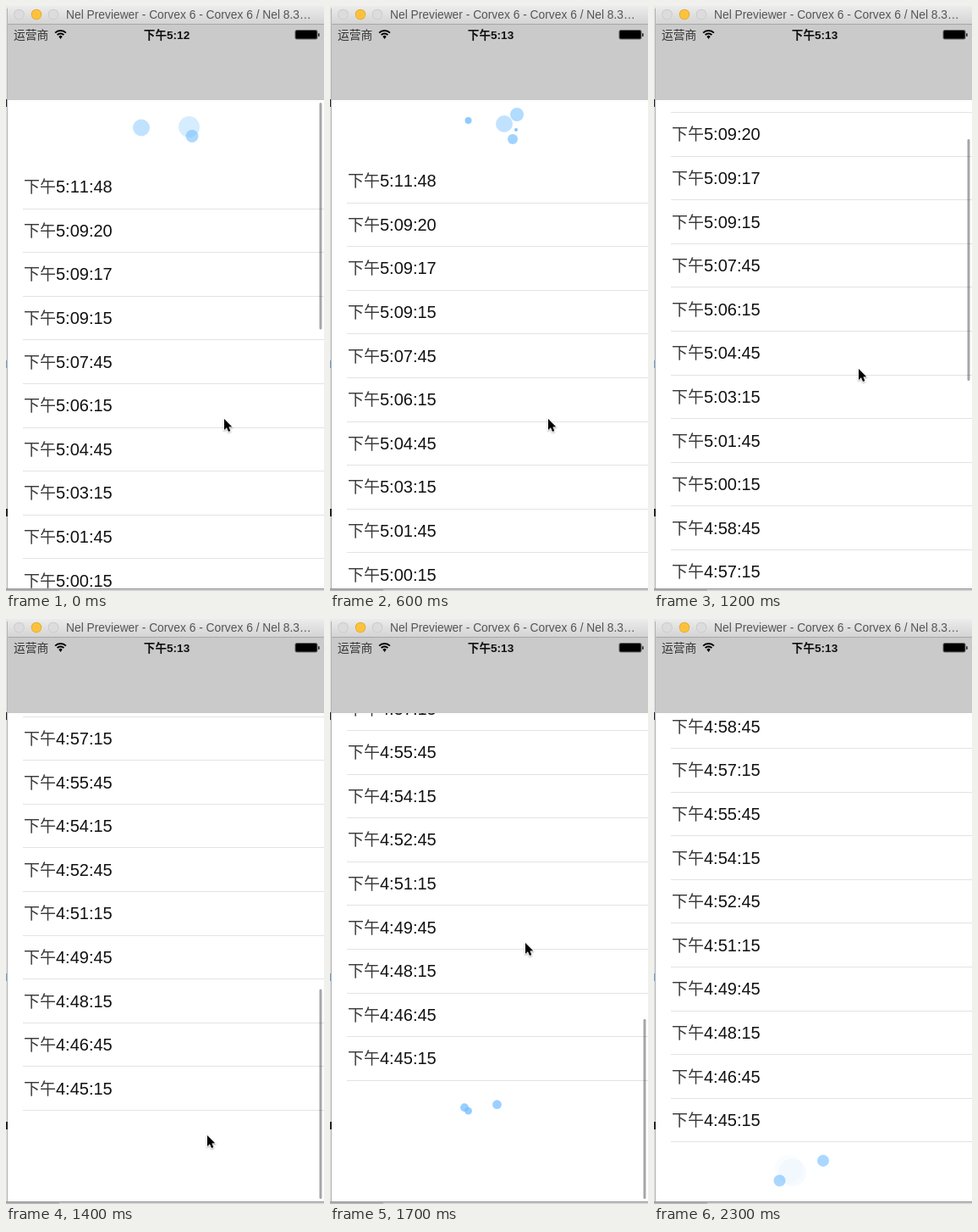
Recreate the animation shown at these times as an HTML page with a canvas. Size 376x690 px, loop 2.4 s.

```html
<!DOCTYPE html>
<html lang="zh">
<head>
<meta charset="utf-8">
<style>
html, body { margin: 0; width: 100%; height: 100%; overflow: hidden; background: #fff; }
canvas { display: block; }
</style>
</head>
<body>
<canvas id="stage" width="376" height="690"></canvas>
<script>
const c = document.getElementById('stage').getContext('2d');
const LOOP = 2400, STEP = 100, PITCH = 51.6, TOP = 111, BOTTOM = 687;
const BAR_TOP = 114, BAR_END = 684, BAR_LENGTH = 285, LAST_REST = -389;
const CJK = "'Noto Sans CJK SC', 'Noto Sans CJK', sans-serif";
const SANS = `'Liberation Sans', Arial, ${CJK}`;

const two = n => String(n).padStart(2, '0');
const clock = s => [Math.floor(s / 3600), two(Math.floor(s / 60) % 60), two(s % 60)].join(':');
const rows = ['5:11:48', '5:09:20', '5:09:17', '5:09:15'];
for (let i = 0; i < 16; i++) rows.push(clock(18465 - 90 * i));

// Each burst starts one bubble per gap, at [x, offset from the strip's middle]
const headBursts = [
  { start: -625, gap: 125, spots: [[216.5, -10], [160, -9], [220, 1]] },
  { start: 100, gap: 100, spots: [[206, -6.5], [221, -17.5], [216, 11.5], [163.5, -10.5], [220, 0.5]] }
];
const footBursts = [
  { start: 1430, gap: 25, spots: [[197.5, -7], [159, -3.5], [163.5, 0.5]] },
  { start: 1950, gap: 0, spots: [[148.5, 10], [200, -13.5]] }
];

const easeOut = p => 1 - (1 - p) ** 3;
const easeIn = p => p ** 4;

// Distance covered so far by a move lasting from t0 to t1
function move(t, t0, t1, distance, ease = p => p) {
  return distance * ease(Math.min(1, Math.max(0, (t - t0) / (t1 - t0))));
}

// Middle of the first row: settle, drag, fling, pull past the end, spring back
const listY = t => 213.5 + move(t, 0, 300, -7, easeOut) + move(t, 700, 1200, -106.5, easeIn)
  + move(t, 1200, 1400, -526.4) + move(t, 1400, 1700, -35.3) + move(t, 1700, 2100, 72.7, easeOut);

const barAlpha = t => 1 - move(t, 100, 400, 1) + move(t, 1000, 1100, 1) - move(t, 1900, 2200, 1);

const cursorX = t => 258 + move(t, 700, 900, 5) - move(t, 900, 1200, 21) - move(t, 1200, 1400, 4)
  - move(t, 1400, 1700, 7) + move(t, 1900, 2200, 160);

const cursorY = t => 487 - move(t, 700, 900, 30) - move(t, 900, 1200, 29)
  + move(t, 1200, 1400, 181) - move(t, 1400, 1700, 227);

function rect(x, y, w, h, color) {
  c.fillStyle = color;
  c.fillRect(x, y, w, h);
}

function disc(x, y, r, color) {
  c.fillStyle = color;
  c.beginPath();
  c.arc(x, y, r, 0, 7);
  c.fill();
}

function pill(x, y, w, h, r, color) {
  c.fillStyle = color;
  c.beginPath();
  c.roundRect(x, y, w, h, r);
  c.fill();
}

function text(s, x, y, font, color, align = 'left') {
  c.font = font;
  c.fillStyle = color;
  c.textAlign = align;
  c.fillText(s, x, y);
}

function drawBubbles(bursts, t, mid) {
  for (const { start, gap, spots } of bursts)
    spots.forEach(([x, dy], i) => {
      const r = (t - start - i * gap) / 50;
      if (r > 0 && r < 17.5) disc(x, mid + dy, r, `rgba(111,188,255,${1 - r / 17.5})`);
    });
}

function drawBackdrop() {
  rect(0, 0, 376, 690, '#e4e4e4');
  rect(1, 3, 1, 685, '#b2b2b2');
  rect(0, 110, 1, 9, '#223');
  rect(0, 418, 1, 9, '#6aa0d0');
  rect(0, 593, 2, 9, '#222');
  rect(0, 687, 376, 1, '#8f8f8f');
  rect(0, 688, 376, 2, '#cfcfcf');
  rect(0, 688, 63, 2, '#b4b4b4');
}

function drawTop(t) {
  const g = c.createLinearGradient(0, 0, 0, 21);
  g.addColorStop(0, '#ececec');
  g.addColorStop(1, '#d4d4d4');
  rect(2, 0, 374, 21, g);
  rect(2, 21, 374, 1, '#a8a8a8');
  rect(2, 22, 374, TOP - 22, '#cacaca');
  for (const x of [15.5, 36, 56]) {
    const on = x === 36;
    disc(x, 10, 6.2, on ? '#dfa32f' : '#c6c6c6');
    disc(x, 10, 5.5, on ? '#fcc23c' : '#dcdcdc');
  }
  text('Nel Previewer - Corvex 6 - Corvex 6 / Nel 8.3…', 71, 15, `13.8px ${SANS}`, '#555');

  text('运营商', 9, 39, `13.8px ${CJK}`, '#333');
  text('下午' + (t < 300 ? '5:12' : '5:13'), 190, 38.5, `bold 13.6px ${SANS}`, '#111', 'center');

  // Signal fan
  const fan = r => {
    c.beginPath();
    c.arc(64.5, 38, r, -Math.PI * 0.75, -Math.PI * 0.25);
  };
  c.strokeStyle = c.fillStyle = '#000';
  c.lineWidth = 2;
  for (const r of [5.5, 9]) {
    fan(r);
    c.stroke();
  }
  fan(3);
  c.lineTo(64.5, 39);
  c.fill();

  // Battery
  pill(341.5, 28, 27, 11.5, 2.5, '#666');
  pill(342.5, 29, 25, 9.5, 1.5, '#000');
  pill(369, 32, 1.7, 4, 1, '#333');
}

function drawBar(t, y) {
  const past = Math.max(0, LAST_REST - y);
  const start = BAR_TOP + past
    + Math.min(BAR_END - BAR_TOP - BAR_LENGTH, Math.max(0, (187 - y) / 576 * BAR_LENGTH));
  const length = BAR_LENGTH - past - Math.max(0, y - 196);
  pill(370.5, start, 3, length, 1.5, `rgba(0,0,0,${0.35 * barAlpha(t)})`);
}

function drawList(t) {
  const y = listY(t);
  c.save();
  c.beginPath();
  c.rect(2, TOP, 374, BOTTOM - TOP);
  c.clip();
  rect(2, TOP, 374, BOTTOM - TOP, '#fff');
  drawBubbles(headBursts, t, y - 61 + move(t, 700, 900, -6.5));
  drawBubbles(footBursts, t, y + 19 * PITCH + 61);

  if (t >= 800 && t <= 1000) rect(2, Math.round(y - 26), 374, 1, '#dcdcde');
  rows.forEach((s, i) => {
    const mid = y + i * PITCH, base = Math.round(mid + 6.7);
    text('下午', 21, base, `300 19px ${CJK}`, '#3a3a3a');
    text(s, 59, base, `20px ${SANS}`, '#111');
    rect(20, Math.floor(mid + 25.5), 356, 1, '#e3e3e5');
  });
  drawBar(t, y);
  c.restore();
}

function drawCursor(x, y) {
  c.save();
  c.translate(x, y);
  c.scale(0.92, 0.92);
  c.beginPath();
  [[0, 0], [0, 14], [3.2, 11.2], [5.5, 16.4], [8, 15.3], [5.8, 10.3], [10, 10]]
    .forEach(p => c.lineTo(...p));
  c.closePath();
  c.shadowColor = 'rgba(0,0,0,.35)';
  c.shadowBlur = 2;
  c.shadowOffsetY = 1;
  c.lineWidth = 1.6;
  c.strokeStyle = '#fff';
  c.stroke();
  c.shadowColor = 'transparent';
  c.fillStyle = '#000';
  c.fill();
  c.restore();
}

function frame() {
  const t = Math.floor(performance.now() % LOOP / STEP) * STEP;
  drawBackdrop();
  drawTop(t);
  drawList(t);
  drawCursor(cursorX(t), cursorY(t));
  requestAnimationFrame(frame);
}
c.fontKerning = 'none';
frame();
</script>
</body>
</html>
```
